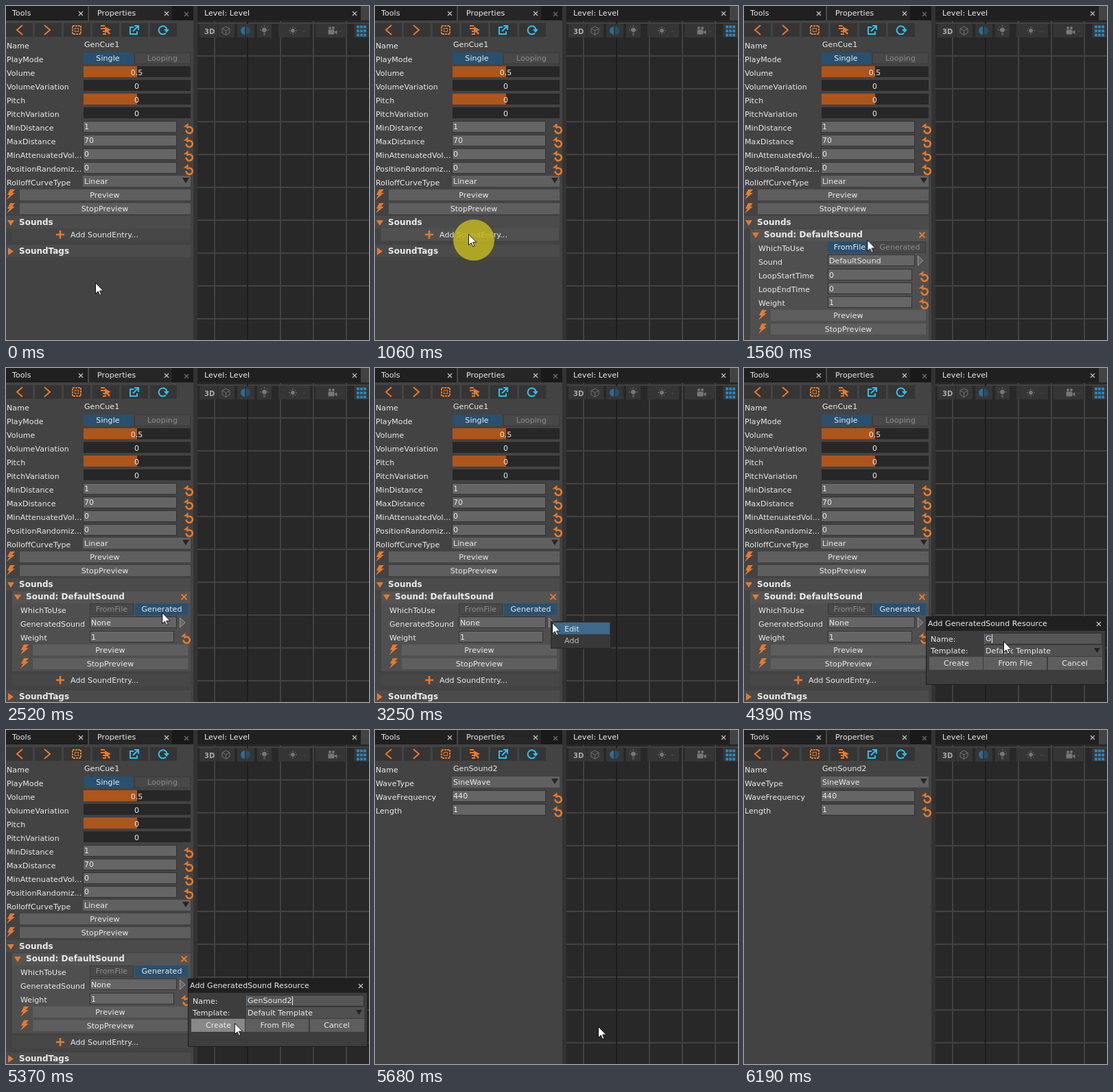
These frames come from a looping animation (529 px wide and 488 px high, 6.32 s). An HTML page:

```html
<!DOCTYPE html>
<html lang="en">
<head>
<meta charset="utf-8">
<title>Sound cue editor</title>
<style>
html, body { margin: 0; width: 100%; height: 100%; overflow: hidden; background: #434343; }
svg { display: block; }
rect, line { shape-rendering: crispEdges; }
text, p { font: 11px "DejaVu Sans", sans-serif; letter-spacing: .08px; fill: #ececec; color: #ececec; }
.mid { text-anchor: middle; }
.bold { font-weight: bold; font-size: 12px; letter-spacing: 0; }
.off { fill: #8e8e8e; }
.dark { fill: #272727; }
.field { fill: #656565; stroke: #323232; }
.btn { fill: #5e5e5e; }
.on { fill: #29506f; }
.idle { fill: #484848; stroke: #393939; }
.org { fill: #e8792b; }
.bar { fill: #ad551b; }
.head { fill: #4b4b4b; }
.tool { fill: #353535; }
.line { fill: none; stroke: #e8792b; stroke-width: 2; }
.cyan { stroke: #2fc0ee; }
.cross { fill: none; stroke: #c8c8c8; stroke-width: 1.2; }

.step { animation: 6320ms step-end infinite; }
#empty { animation-name: empty; }
#file { animation-name: file; }
#gen { animation-name: gen; }
#cue { animation-name: cue; }
#wave { animation-name: wave; }
#addHover { animation-name: addHover; }
#menu { animation-name: menu; }
#pick { animation-name: pick; }
#dialog { animation-name: dialog; }
#selected { animation-name: selected; }
#createHover { animation-name: createHover; }
#ring { animation-name: ring; }
#mouse { animation: mouse 6320ms infinite; }

@keyframes empty { 0% { opacity: 1 } 18.03% { opacity: 0 } }
@keyframes file { 0%, 35.44% { opacity: 0 } 18.03% { opacity: 1 } }
@keyframes gen { 0%, 89.87% { opacity: 0 } 35.44% { opacity: 1 } }
@keyframes cue { 0% { opacity: 1 } 89.87% { opacity: 0 } }
@keyframes wave { 0% { opacity: 0 } 89.87% { opacity: 1 } }
@keyframes addHover { 0% { opacity: 0 } 8.22% { opacity: 1 } }
@keyframes menu { 0%, 62.5% { opacity: 0 } 51.42% { opacity: 1 } }
@keyframes pick { 0% { transform: none } 59.02% { transform: translateY(18px) } }
@keyframes dialog { 0%, 89.24% { opacity: 0 } 62.81% { opacity: 1 } }
@keyframes selected { 0% { opacity: 1 } 69.46% { opacity: 0 } }
@keyframes createHover { 0% { opacity: 0 } 84.17% { opacity: 1 } }
@keyframes ring {
  0%, 17.56%, 35.12%, 62.5%, 89.24% { opacity: 0 }
  16.77%, 34.17%, 61.55%, 88.29% { opacity: .86 }
}
@keyframes mouse {
  0%, 4.59% { transform: translate(130px, 404px); animation-timing-function: ease }
  11.23%, 22.78% { transform: translate(136px, 333px); animation-timing-function: ease }
  29.59%, 37.66% { transform: translate(227px, 351px); animation-timing-function: ease-in }
  39.87% { transform: translate(227px, 357px); animation-timing-function: ease-out }
  46.68%, 51.42% { transform: translate(258px, 372px); animation-timing-function: ease-in-out }
  58.7% { transform: translate(295px, 394px); animation-timing-function: ease-out }
  60.28%, 62.81% { transform: translate(297px, 398px); animation-timing-function: ease }
  64.87%, 81.96% { transform: translate(378px, 399px); animation-timing-function: ease-in-out }
  86.08%, 92.4% { transform: translate(325px, 433px); animation-timing-function: ease-in }
  97.94%, 100% { transform: translate(448px, 492px) }
}

/* Each typed letter carries the caret; the next letter covers it. */
p { margin: 0; line-height: 14px; white-space: nowrap; }
p span {
  visibility: hidden; background: #565656;
  animation: key 6320ms step-end infinite;
  animation-delay: calc(4390ms + var(--n) * 70ms);
}
@keyframes key { 0% { visibility: visible; box-shadow: 1px 0 #eee } 25% { visibility: hidden } }
</style>
</head>
<body>
<svg width="529" height="488" viewBox="0 0 529 488">
<defs>
  <pattern id="grid" x="303" y="72" width="48" height="48" patternUnits="userSpaceOnUse">
    <path d="M0 0H48V2H2V48H0Z" fill="#424242" shape-rendering="crispEdges"/>
  </pattern>
  <g id="reset">
    <path d="M3.6 4.2A4.6 4.6 0 1 0 4.6 1.5" class="line" style="stroke-width:2.6"/>
    <path d="M-.5-.2H6.5V-6Z" class="org"/>
  </g>
  <path id="bolt" class="org" d="M5 0H12L8 5H12L0 15L4 8H1Z"/>
  <path id="plus" class="line" style="stroke-width:2.6" d="M-6 0H6M0-6V6"/>
  <path id="down" class="org" d="M-5-4H5L0 4Z"/>
  <path id="cross" class="cross" d="M-3-3L3 3M3-3L-3 3"/>
  <g id="num"><rect x="112.5" y=".5" width="136" height="16" class="field"/><use href="#reset" x="259" y="9"/></g>
  <g id="sub"><rect x="122.5" y=".5" width="122" height="16" class="field"/><use href="#reset" x="255" y="9"/></g>
  <g id="drop">
    <rect x="112" width="157" height="16" fill="#606060"/>
    <path d="M257 3H267L262 11Z" fill="#262626"/>
  </g>
  <g id="pickArrow">
    <rect x="122.5" y="363.5" width="126" height="16" class="field"/>
    <path d="M253.5 365V379L261 372Z" fill="#666" stroke="#999"/>
  </g>
  <g id="add">
    <use href="#plus" x="79" y="334"/>
    <text x="94" y="338">Add SoundEntry...</text>
  </g>
  <g id="tags">
    <rect y="349" width="269" height="18" class="head"/>
    <path d="M3 353V364L11 358.500Z" class="org"/>
    <text x="19" y="362" class="bold">SoundTags</text>
  </g>
  <g id="entry">
    <rect x="9" y="326" width="260" height="18" fill="#545454"/>
    <use href="#down" x="17" y="335"/>
    <text x="29" y="338" class="bold">Sound: DefaultSound</text>
    <path d="M255.500 330.500L263.500 338.500M263.500 330.500L255.500 338.500" class="line"/>
    <text x="21" y="358">WhichToUse</text>
  </g>
  <g id="tail">
    <text x="21" y="438">Weight</text>
    <use href="#sub" y="424"/>
    <text x="124" y="437">1</text>
    <use href="#bolt" x="21" y="444"/><use href="#bolt" x="21" y="464"/>
    <rect x="39" y="444" width="226" height="16" class="btn"/>
    <rect x="39" y="464" width="226" height="16" class="btn"/>
    <text x="152" y="456" class="mid">Preview</text>
    <text x="152" y="476" class="mid">StopPreview</text>
  </g>
</defs>

<rect width="529" height="488" fill="#434343"/>

<!-- panel tabs -->
<rect width="274" height="21" fill="#191919"/>
<rect width="118" height="20" fill="#202020"/>
<rect x="121" width="121" height="21" fill="#262626"/>
<rect x="119" width="2" height="21" fill="#4a4a4a"/>
<text x="9" y="14">Tools</text>
<text x="133" y="14">Properties</text>
<use href="#cross" x="109" y="11"/><use href="#cross" x="234" y="11"/>
<use href="#cross" x="263" y="12" opacity=".5"/>

<!-- panel toolbar -->
<g class="tool">
  <rect y="25" width="39" height="20"/><rect x="42" y="25" width="39" height="20"/>
  <rect x="84" y="25" width="39" height="20"/><rect x="126" y="25" width="39" height="20"/>
  <rect x="168" y="25" width="39" height="20"/><rect x="210" y="25" width="39" height="20"/>
</g>
<path d="M24 28L16 35L24 42M56 28L64 35L56 42" class="line"/>
<rect x="97" y="29" width="12" height="12" class="line" stroke-dasharray="3 1"/>
<rect x="100.500" y="32.500" width="5" height="5" class="line" style="stroke-width:1"/>
<path d="M138 29H144M138 33H144M141 37H146M141 41H146" class="line"/>
<path d="M144 30L153 35L149 36.500L152 40L150 42L147 38L144 40Z" class="org"/>
<path d="M186 31H181V41H191V37M185 37L192 30M187 29H193V35" class="line cyan"/>
<path d="M234.500 34A6 6 0 1 0 233 39.500" class="line cyan"/>
<path d="M230 34H238L234 39Z" fill="#2fc0ee"/>

<!-- level view -->
<rect x="273" width="6" height="488" fill="#333"/>
<rect x="279" width="250" height="488" fill="#282828"/>
<rect x="279" y="22" width="250" height="466" fill="url(#grid)"/>
<rect x="351" y="22" width="2" height="466" fill="#1d1d1d"/>
<rect x="279" width="238" height="21" fill="#202020"/>
<rect x="517" width="12" height="21" fill="#434343"/>
<text x="289" y="14">Level: Level</text>
<use href="#cross" x="508" y="11"/>
<g class="tool">
  <rect x="282" y="26" width="26" height="20"/><rect x="309" y="26" width="24" height="20"/>
  <rect x="337" y="26" width="25" height="20"/><rect x="366" y="26" width="21" height="20"/>
  <rect x="397" y="26" width="46" height="20"/><rect x="451" y="26" width="45" height="20"/>
  <rect x="507" y="26" width="22" height="20"/>
</g>
<text x="289" y="41" class="bold" style="font-size:10px;fill:#aaa">3D</text>
<path d="M320.500 30L326 33V39L320.500 42.500L315 39V33ZM315 33L320.500 36L326 33M320.500 36V42" fill="none" stroke="#717171"/>
<path d="M348 30A6 6 0 0 0 348 42Z" fill="#2a6d98"/>
<path d="M350 30A6 6 0 0 1 350 42Z" fill="#24506c"/>
<g fill="#777" stroke="#777">
  <circle cx="376.500" cy="35" r="3"/>
  <path d="M375 40H378M375 42H378M376.500 28V30M370 35H372M381 35H383M372 30L373 31M381 30L380 31"/>
  <circle cx="418" cy="36" r="2.500"/>
  <path d="M418 30V32M418 40V42M412 36H414M422 36H424M414 32L415 33M422 32L421 33M414 40L415 39M422 40L421 39"/>
  <path d="M432 37H436M486 37H490" stroke="#4c4c4c"/>
  <path d="M470 35H478V41H470ZM479 38L482 36V41Z"/>
  <circle cx="472" cy="32" r="1.500"/><circle cx="477" cy="32" r="1.500"/>
</g>
<path d="M511 30.500H525M511 36.500H525M511 42.500H525" fill="none" stroke="#2b86bb" stroke-width="4" stroke-dasharray="4 1"/>

<text x="1" y="62">Name</text>

<g id="cue" class="step">
  <text x="114" y="60">GenCue1</text>
  <text x="1" y="82">PlayMode</text>
  <rect x="113" y="68" width="72" height="17" class="on"/>
  <rect x="187.500" y="68.500" width="81" height="16" class="idle"/>
  <text x="148.500" y="80" class="mid">Single</text>
  <text x="228" y="80" class="mid off">Looping</text>

  <g class="dark">
    <rect x="113" y="88" width="156" height="16"/><rect x="113" y="108" width="156" height="16"/>
    <rect x="113" y="128" width="156" height="16"/><rect x="113" y="148" width="156" height="16"/>
  </g>
  <rect x="113" y="88" width="78" height="16" class="bar"/>
  <rect x="113" y="128" width="78" height="16" class="bar"/>
  <text x="1" y="102">Volume</text><text x="190.500" y="101" class="mid">0.5</text>
  <text x="1" y="122">VolumeVariation</text><text x="190.500" y="121" class="mid">0</text>
  <text x="1" y="142">Pitch</text><text x="190.500" y="141" class="mid">0</text>
  <text x="1" y="162">PitchVariation</text><text x="190.500" y="161" class="mid">0</text>

  <use href="#num" y="168"/><use href="#num" y="188"/><use href="#num" y="208"/><use href="#num" y="228"/>
  <text x="1" y="182">MinDistance</text><text x="114" y="180">1</text>
  <text x="1" y="202">MaxDistance</text><text x="114" y="200">70</text>
  <text x="1" y="222">MinAttenuatedVol...</text><text x="114" y="220">0</text>
  <text x="1" y="242">PositionRandomiz...</text><text x="114" y="240">0</text>
  <text x="1" y="262">RolloffCurveType</text>
  <use href="#drop" y="248"/><text x="114" y="260">Linear</text>

  <use href="#bolt" x="1" y="268"/><use href="#bolt" x="1" y="288"/>
  <rect x="20" y="268" width="249" height="16" class="btn"/>
  <rect x="20" y="288" width="249" height="16" class="btn"/>
  <text x="144" y="280" class="mid">Preview</text>
  <text x="144" y="300" class="mid">StopPreview</text>

  <rect y="307" width="269" height="18" class="head"/>
  <use href="#down" x="7" y="317"/>
  <text x="19" y="320" class="bold">Sounds</text>

  <g id="empty" class="step">
    <rect x="9" y="325" width="259" height="18" fill="#474747"/>
    <rect id="addHover" class="step" x="9" y="325" width="259" height="18" fill="#505050"/>
    <use href="#add"/>
    <use href="#tags"/>
  </g>

  <g id="file" class="step">
    <rect x="9" y="326" width="260" height="162" fill="#4f4f4f"/>
    <use href="#entry"/>
    <rect x="122" y="344" width="64" height="17" class="on"/>
    <rect x="188.500" y="344.500" width="76" height="16" class="idle"/>
    <text x="154" y="356" class="mid">FromFile</text>
    <text x="227" y="356" class="mid off">Generated</text>
    <use href="#pickArrow"/>
    <text x="21" y="378">Sound</text><text x="124" y="376">DefaultSound</text>
    <use href="#sub" y="384"/><use href="#sub" y="404"/>
    <text x="21" y="398">LoopStartTime</text><text x="124" y="397">0</text>
    <text x="21" y="418">LoopEndTime</text><text x="124" y="417">0</text>
    <use href="#tail"/>
  </g>

  <g id="gen" class="step">
    <rect x="9" y="326" width="260" height="117" fill="#4f4f4f"/>
    <use href="#entry"/>
    <rect x="122.500" y="344.500" width="63" height="16" class="idle"/>
    <rect x="188" y="344" width="77" height="17" class="on"/>
    <text x="154" y="356" class="mid off">FromFile</text>
    <text x="227" y="356" class="mid">Generated</text>
    <use href="#pickArrow"/>
    <text x="21" y="378">GeneratedSound</text><text x="124" y="376">None</text>
    <use href="#tail" y="-40"/>
    <rect x="9" y="447" width="259" height="18" fill="#474747"/>
    <use href="#add" y="122"/>
    <use href="#tags" y="122"/>
  </g>
</g>

<g id="wave" class="step">
  <text x="114" y="60">GenSound2</text>
  <text x="1" y="82">WaveType</text>
  <use href="#drop" y="68"/><text x="114" y="80">SineWave</text>
  <use href="#num" y="88"/><use href="#num" y="108"/>
  <text x="1" y="102">WaveFrequency</text><text x="114" y="100">440</text>
  <text x="1" y="122">Length</text><text x="114" y="120">1</text>
</g>

<g id="menu" class="step">
  <rect x="256.500" y="370.500" width="87" height="39" fill="#383838" stroke="#272727"/>
  <rect id="pick" class="step" x="258" y="372" width="84" height="17" fill="#3d6a8c"/>
  <text x="276" y="385">Edit</text>
  <text x="276" y="402" style="fill:#bbb">Add</text>
</g>

<g id="dialog" class="step">
  <rect x="265.500" y="363.500" width="261" height="99" fill="#3d3d3d" stroke="#1c1c1c"/>
  <rect x="266" y="364" width="260" height="20" fill="#202020"/>
  <text x="268" y="377">Add GeneratedSound Resource</text>
  <use href="#cross" x="517" y="374"/>
  <text x="272" y="400">Name:</text>
  <text x="272" y="417">Template:</text>
  <rect x="350.500" y="387.500" width="171" height="16" fill="#565656" stroke="#303030"/>
  <rect x="350" y="388" width="1" height="16" fill="#3c78b0"/>
  <g id="selected" class="step">
    <rect x="352" y="389" width="120" height="13" fill="#31618a"/>
    <text x="352" y="400">New GeneratedSound</text>
  </g>
  <foreignObject x="352" y="389" width="165" height="14">
    <p><span style="--n:0">G</span><span style="--n:1">e</span><span style="--n:2">n</span><span style="--n:3">S</span><span style="--n:4">o</span><span style="--n:5">u</span><span style="--n:6">n</span><span style="--n:7">d</span><span style="--n:9">2</span></p>
  </foreignObject>
  <rect x="350" y="405" width="172" height="16" fill="#505050"/>
  <text x="352" y="417">Default Template</text>
  <path d="M510 409H519L514.500 416Z" fill="#222"/>
  <g class="btn">
    <rect x="270" y="422" width="78" height="19"/><rect x="349" y="422" width="92" height="19"/>
    <rect x="443" y="422" width="79" height="19"/>
  </g>
  <rect id="createHover" class="step" x="270" y="422" width="78" height="19" fill="#888"/>
  <text x="309.500" y="435" class="mid">Create</text>
  <text x="395.500" y="435" class="mid">From File</text>
  <text x="482" y="435" class="mid">Cancel</text>
</g>

<g id="mouse">
  <circle id="ring" class="step" cx="8" cy="9" r="30" fill="#bfb51f"/>
  <path d="M.5.5V16.500L4.200 13L6.600 18.500L9 17.500L6.600 12.200H11.800Z" fill="#fff" stroke="#111"/>
</g>
</svg>
</body>
</html>
```
